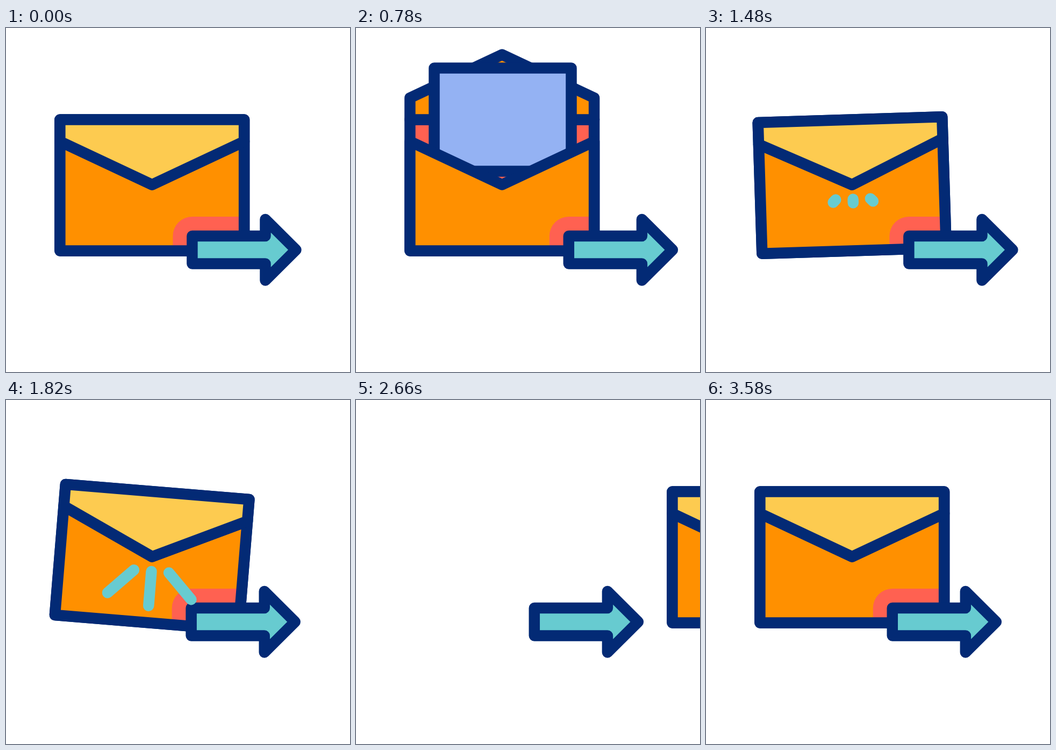
Write an HTML page with a canvas that moves like this. It is 640 px wide and 640 px high and loops after 3.6 s.

```html
<!DOCTYPE html>
<html lang="en">
<head>
<meta charset="utf-8">
<title>Forward mail</title>
<style>
  html, body { margin: 0; width: 100%; height: 100%; overflow: hidden; background: #fff; }
  canvas { display: block; width: 640px; height: 640px; }
</style>
</head>
<body>
<canvas id="stage" width="640" height="640"></canvas>
<script>
const ctx = document.getElementById('stage').getContext('2d');

const NAVY = '#032a75', ORANGE = '#ff9000', YELLOW = '#fdcb50';
const RED = '#ff6151', CYAN = '#67cbd0', LAVENDER = '#94b2f3';
const LINE = 20.5;
const LOOP = 3600, TICK = 20;

// Envelope
const LEFT = 100.4, RIGHT = 443.1, TOP = 170.5, BOTTOM = 414.5;
const MID = (LEFT + RIGHT) / 2;
const SHOULDER = 40.5, APEX = 121;
const PIVOT_Y = TOP + APEX;

// Arrow
const TAIL_X = 346.4, NECK_X = 482.5, TIP_X = 539.5, AXIS_Y = 412.7;
const SHAFT = 25.75, BARB = 56.75;
const ARROW_BACK = -39.5, ARROW_FRONT = 50;

const mix = (a, b, s) => a + (b - a) * s;
const smooth = s => s * s * (3 - 2 * s);

// Eased progress from 0 to 1 between two ticks.
function ramp(tick, from, to) {
  return smooth(Math.min(1, Math.max(0, (tick - from) / (to - from))));
}

// The arrow swings back and forth, leaving from and returning to rest.
function arrowOffset(tick) {
  const swing = tick / 20;
  if (swing < 1) return ARROW_BACK * smooth(swing);
  const back = swing > 8 ? 0 : ARROW_BACK;
  return mix(back, ARROW_FRONT, smooth(Math.abs(swing % 2 - 1)));
}

function mailOffset(tick) {
  return tick < 140 ? 565 * ramp(tick, 110, 140) : -472 * (1 - ramp(tick, 140, 170));
}

function mailDip(tick) {
  return 24.5 * (ramp(tick, 40, 50) - ramp(tick, 50, 60));
}

function mailTilt(tick) {
  return 5 * (2 * ramp(tick, 80, 90) - ramp(tick, 70, 80)
            - 2 * ramp(tick, 90, 100) + ramp(tick, 100, 110));
}

// 1 is closed, 0 edge-on, -1 wide open.
function flapTurn(tick) {
  const opening = ramp(tick, 0, 10) + ramp(tick, 10, 20);
  const closing = ramp(tick, 50, 60) + ramp(tick, 60, 70);
  return 1 - opening + closing;
}

function polygon(points) {
  const path = new Path2D();
  points.forEach(([x, y]) => path.lineTo(x, y));
  path.closePath();
  return path;
}

function box(x, y, width, height) {
  const path = new Path2D();
  path.rect(x, y, width, height);
  return path;
}

function stroke(path, color, width) {
  ctx.strokeStyle = color;
  ctx.lineWidth = width;
  ctx.stroke(path);
}

function fill(path, color) {
  ctx.fillStyle = color;
  ctx.fill(path);
}

function shape(path, color) {
  fill(path, color);
  stroke(path, NAVY, LINE);
}

// A straight edge at the given height joined to the V fold.
function foldShape(edgeY, turn) {
  const side = TOP + SHOULDER * turn;
  return polygon([[LEFT, edgeY], [LEFT, side], [MID, TOP + APEX * turn],
                  [RIGHT, side], [RIGHT, edgeY]]);
}

function arrowShape() {
  const half = [[TAIL_X, -SHAFT], [NECK_X, -SHAFT], [NECK_X, -BARB], [TIP_X, 0]];
  const mirrored = half.slice(0, -1).reverse().map(([x, y]) => [x, -y]);
  return polygon([...half, ...mirrored].map(([x, y]) => [x, AXIS_Y + y]));
}

const back = box(LEFT, TOP, RIGHT - LEFT, BOTTOM - TOP);
const pocket = foldShape(BOTTOM, 1);
const arrow = arrowShape();

function mailMatrix(tick) {
  return new DOMMatrix()
    .translate(mailOffset(tick) + MID, mailDip(tick) + PIVOT_Y)
    .rotate(mailTilt(tick))
    .translate(-MID, -PIVOT_Y);
}

function drawShadow(mail, arrowX) {
  ctx.save();
  ctx.setTransform(mail);
  ctx.clip(pocket);
  ctx.setTransform(1, 0, 0, 1, arrowX, 0);
  fill(arrow, RED);
  stroke(arrow, RED, 72);
  ctx.restore();
}

function drawMail(tick, mail, arrowX) {
  const turn = flapTurn(tick);
  const flap = foldShape(TOP, turn);

  ctx.setTransform(mail);
  shape(back, RED);
  if (turn < 0) shape(flap, ORANGE);
  if (tick > 20 && tick < 70) {
    shape(box(145.5, mix(-205, 195.5, ramp(tick, 20, 50)), 255, 192), LAVENDER);
  }

  fill(pocket, ORANGE);
  drawShadow(mail, arrowX);
  stroke(pocket, NAVY, LINE);
  if (turn >= 0) shape(flap, YELLOW);
}

function drawRays(tick, mail) {
  const head = ramp(tick, 70, 90), tail = ramp(tick, 90, 110);
  if (head - tail < 0.001) return;
  ctx.setTransform(mail);
  for (const side of [-1, 0, 1]) {
    const length = side ? 46.5 : 64.5;
    const ray = new Path2D();
    for (const p of [tail, head]) {
      ray.lineTo(MID + 1 + side * mix(32.3, 78, p), 318.5 + length * p);
    }
    stroke(ray, CYAN, LINE);
  }
}

function draw(tick) {
  const mail = mailMatrix(tick);
  const arrowX = arrowOffset(tick);

  ctx.setTransform(1, 0, 0, 1, 0, 0);
  ctx.fillStyle = '#fff';
  ctx.fillRect(0, 0, 640, 640);
  ctx.lineJoin = ctx.lineCap = 'round';

  drawMail(tick, mail, arrowX);
  ctx.setTransform(1, 0, 0, 1, arrowX, 0);
  shape(arrow, CYAN);
  drawRays(tick, mail);
}

const start = performance.now();

function frame() {
  draw((performance.now() - start) % LOOP / TICK);
  requestAnimationFrame(frame);
}

frame();
</script>
</body>
</html>
```
